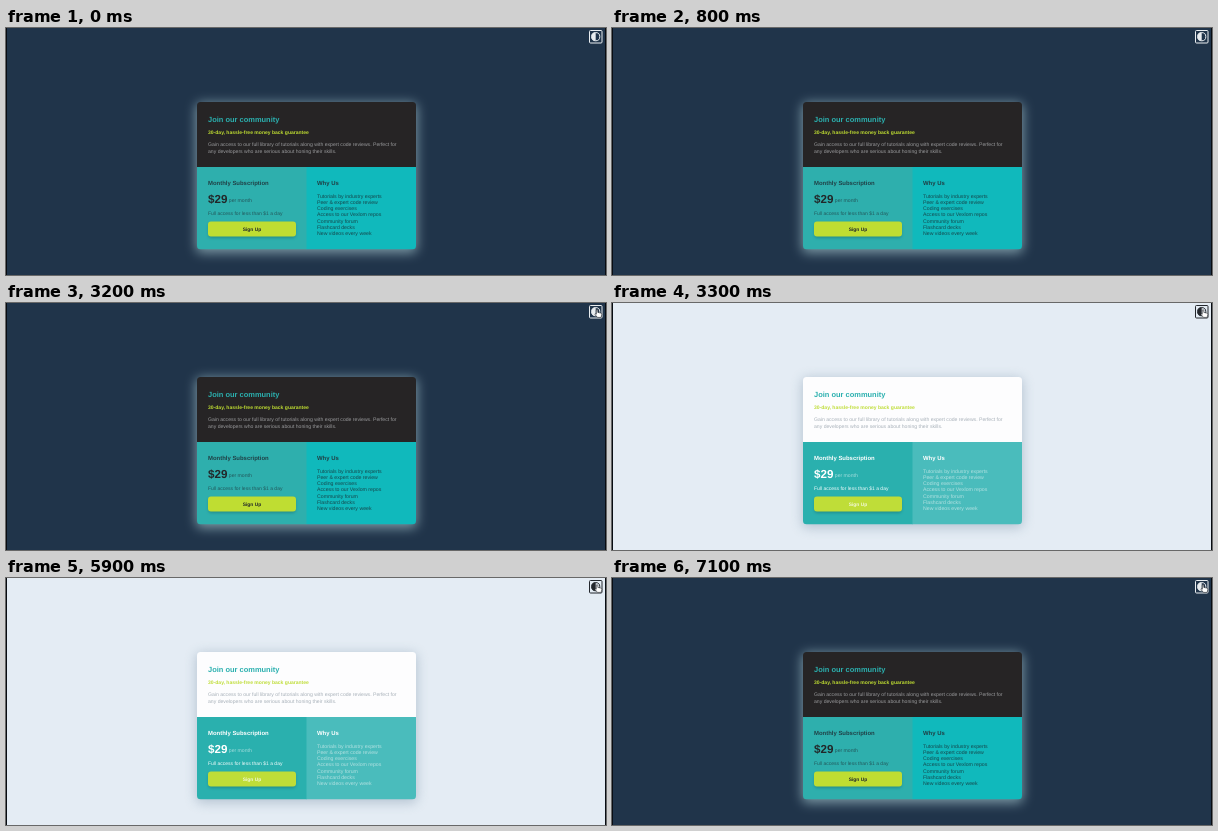
Write an HTML page that moves like this. It is 600 px wide and 247 px high and loops after 7200 ms.

```html
<!DOCTYPE html>
<html lang="en">
<head>
<meta charset="utf-8">
<title>Theme switch</title>
<style>
html, body { margin: 0; width: 100%; height: 100%; overflow: hidden; }
body {
  --bg: #e4ecf4; --head: #fdfdfe; --left: #2ab0ae; --right: #4abcbc;
  --accent: #bfdd38; --copy: #a7b0b9; --strong: #fff; --soft: #a5dedd;
  --list: #b2e1e1; --access: #f2fbfb; --icon: #23272d; --glow: #7d93a8;
  background: var(--bg);
}
body.dark {
  --bg: #20344a; --head: #262425; --left: #2eafad; --right: #10b9bc;
  --accent: #bfdd32; --copy: #9a9b9d; --strong: #204046; --soft: #23575b;
  --list: #16484d; --access: #23595c; --icon: #e9edf0; --glow: #b9dbe0;
}
svg { display: block; width: 600px; height: 247px; }
text {
  font: 5.12px "Liberation Sans", Arial, sans-serif;
  text-rendering: geometricPrecision;
  fill: var(--copy);
}
.title { font-size: 7.48px; font-weight: 700; fill: #2bb0af; }
.offer { font-size: 5.04px; font-weight: 700; fill: var(--accent); }
.sub { font-size: 5.95px; font-weight: 700; fill: var(--strong); }
.price { font-size: 11.6px; font-weight: 700; fill: #fff; }
.dark .price, .dark .button { fill: #222729; }
.soft { fill: var(--soft); }
.access { font-size: 5.03px; fill: var(--access); }
.button { font-size: 4.9px; font-weight: 700; fill: #f3f8d9; text-anchor: middle; }
.list text { font-size: 5.2px; fill: var(--list); }
.glow { fill: var(--glow); opacity: .45; filter: blur(6px); }
.dark .glow { opacity: .6; }
</style>
</head>
<body class="dark">
<svg viewBox="0 0 600 247">
  <defs><clipPath id="card"><rect x="191" y="74" width="219" height="147.3" rx="3.5"/></clipPath></defs>
  <rect width="600" height="247" fill="var(--bg)"/>
  <path d="M0 0h1v247h-1zM599 0h1v247h-1z" fill="#080c12"/>

  <rect class="glow" x="190" y="75" width="221" height="150" rx="5"/>
  <g clip-path="url(#card)">
    <rect x="191" y="74" width="219" height="65" fill="var(--head)"/>
    <rect x="191" y="139" width="110" height="83" fill="var(--left)"/>
    <rect x="300.5" y="139" width="110" height="83" fill="var(--right)"/>
  </g>

  <text class="title" x="202" y="93.6">Join our community</text>
  <text class="offer" x="202" y="106">30-day, hassle-free money back guarantee</text>
  <text x="202" y="117.7">Gain access to our full library of tutorials along with expert code reviews. Perfect for</text>
  <text x="202" y="124.7">any developers who are serious about honing their skills.</text>

  <text class="sub" x="202" y="157">Monthly Subscription</text>
  <text class="price" x="202" y="174.6">$29</text>
  <text class="soft" x="222.8" y="174.2">per month</text>
  <text class="access" x="202" y="186.8">Full access for less than $1 a day</text>
  <rect x="202.5" y="195" width="87" height="15" rx="3" fill="#104e50" opacity=".35" style="filter:blur(1.5px)"/>
  <rect x="202" y="193.5" width="88" height="15" rx="3" fill="var(--accent)"/>
  <text class="button" x="246" y="202.8">Sign Up</text>

  <text class="sub" x="311" y="157">Why Us</text>
  <g class="list" id="list"></g>

  <g stroke="var(--icon)" fill="none">
    <rect x="583.5" y="2.5" width="12.5" height="12.5" rx="1"/>
    <circle cx="589.7" cy="8.7" r="4.1"/>
    <path d="M589.7 4.6a4.1 4.1 0 0 0 0 8.2z" fill="var(--icon)" stroke="none"/>
  </g>
  <path id="hand" fill="#fff" stroke="#22262b" stroke-width=".6" stroke-linejoin="round"
    d="M0 .6Q.8-.4 1.5.6V3l3.2.7q.9.3.8 1.3L4.9 8H1.2L-1.2 5.2q-.4-1 .5-.9L0 4.8z"/>
</svg>
<script>
const LOOP = 7200, STEP = 100;
const hand = document.getElementById("hand");

document.getElementById("list").innerHTML = [
  "Tutorials by industry experts", "Peer &amp; expert code review", "Coding exercises",
  "Access to our Vexlom repos", "Community forum", "Flashcard decks", "New videos every week"
].map((item, i) => `<text x="311" y="${169.6 + i * 6.28}">${item}</text>`).join("");

const lerp = (a, b, p) => a + (b - a) * p;

function draw(now) {
  const t = Math.floor(now % LOOP / STEP) * STEP;
  document.body.classList.toggle("dark", t < 3300 || t >= 6000);

  // The pointer comes in from the right edge and rests on the switch.
  const p = Math.min(1, Math.max(0, (t - 1300) / 800));
  hand.style.visibility = t < 1300 ? "hidden" : "visible";
  hand.setAttribute("transform", `translate(${lerp(599, 590.3, p)} ${lerp(52, 6.4, p)})`);
  requestAnimationFrame(draw);
}
requestAnimationFrame(draw);
</script>
</body>
</html>
```
